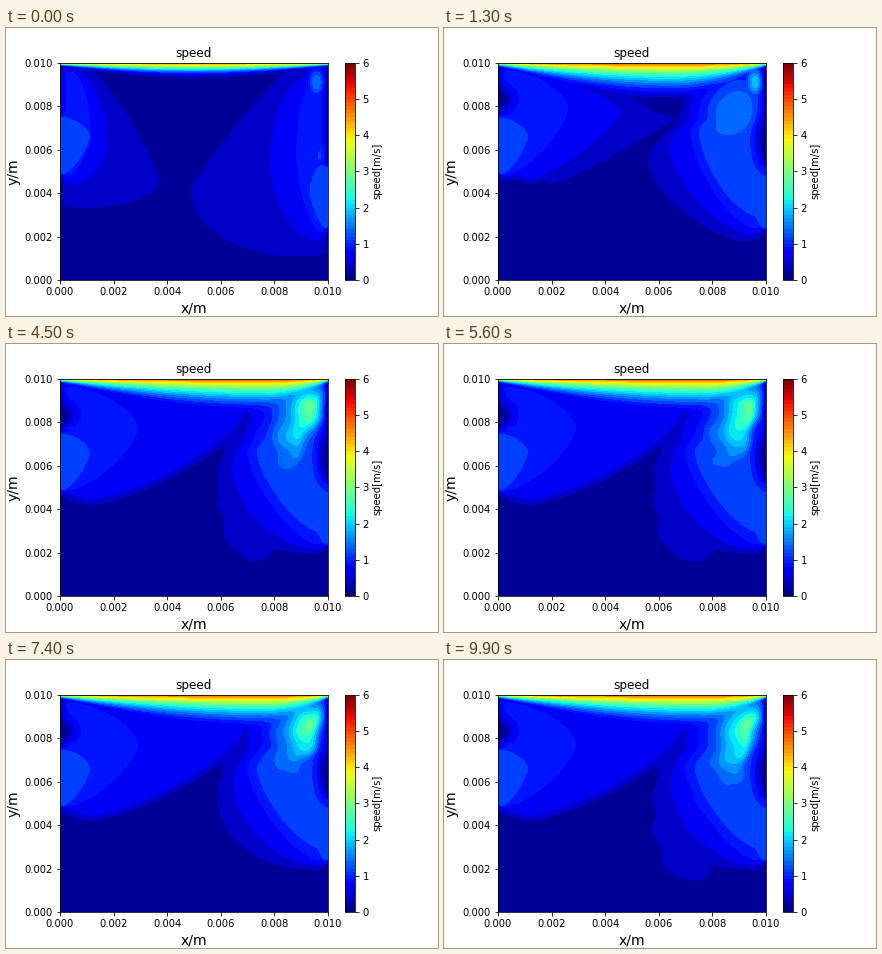
These frames come from a looping animation (432 px wide and 288 px high, 10000 ms). A matplotlib script:

```python
import numpy as np
import matplotlib.pyplot as plt
from matplotlib.animation import FuncAnimation
from matplotlib.cm import ScalarMappable
from matplotlib.colors import Normalize

FRAMES, STEP = 100, 100
SIZE = 0.01
LEVELS = np.linspace(0, 6, 25)
BAND = LEVELS[1]
COLORS = plt.cm.jet((LEVELS[:-1] + LEVELS[1:]) / 12)

# Positions are in percent of the box. Keys: start, spin-up, developed.
# Lobe: centre x, y, half width, reach up, reach down, exponents up, down
LEFT_OUTER = [(10, 46, 27, 52, 12.5, 1.2, 2.0),
              (20, 75, 46, 20, 31, 1.1, 1.1),
              (13, 85, 60, 20, 41, 1.35, 1.35)]
LEFT_INNER = [(3, 70, 8, 26, 22, 2.0, 1.7),
              (4, 79, 22, 17, 30, 1.6, 1.4),
              (4, 77, 25, 19, 28, 1.6, 1.4)]
RIGHT_OUTER = [(88, 42, 39, 58, 31, 1.1, 2.0),
               (92, 55, 36, 30, 37, 1.5, 1.5),
               (92, 53, 33, 33, 33, 2.0, 2.0)]
RIGHT_INNER = [(98, 56, 9.5, 36, 35, 2.5, 1.6),
               (96, 68, 24, 18, 44, 1.5, 1.5),
               (96, 66, 26, 25, 42, 1.4, 1.4)]
INLET = (0, 66, 11, 9, 18, 1.6, 1.4)
OUTLET = (100, 40, 6.5, 14, 17, 2.0, 1.4)
LEFT_BLEND = (0.75, 0.5, 0.1)
RIGHT_BLEND = (0.75, 0.5, 0.5)

FLOW = dict(
    top=(4.4, 5, 5), fade=(1.5, 1, 1), depth=(2.8, 7.2, 7.3),
    peak=(50, 65, 76), cx=(95, 88.5, 94), cy=(90, 77, 87),
    amp=(0.5, 1.5, 3.1), sharp=(2, 2, 1.1), left=(6, 16, 12),
    right=(5, 16, 6), down=(12, 27, 30), up=(8, 24, 12),
    corner=(1.5, 2, 0.8))

X, Y = np.meshgrid(np.linspace(0, 100, 150),
                   100 - 100 * np.linspace(1, 0, 150) ** 1.5)


def mix(keys, k):
    keys = np.array(keys, float)
    i = min(int(k), len(keys) - 2)
    return keys[i] + (keys[i + 1] - keys[i]) * (k - i)


def stage_of(t):
    """0 at the start, 1 after spin-up, 2 when developed."""
    if t < 1.3:
        return 1 - (1 - t / 1.3) ** 2
    s = min((t - 1.3) / 1.4, 1)
    return 1 + s * s * (3 - 2 * s)


def lobe(shape):
    """Superellipse measure: 1 on the rim, less inside."""
    cx, cy, a, up, down, p_up, p_down = shape
    above = Y > cy
    p = np.where(above, p_up, p_down)
    reach = np.where(above, up, down)
    return (abs(X - cx) / a) ** p + (abs(Y - cy) / reach) ** p


def plateau(n, q):
    """Speed that enters band n where q drops below 1."""
    return BAND * n + np.minimum(3 * (1 - q), BAND / 2)


def side(outer, inner, blend, port, core, k):
    a, b = mix(outer, k), mix(inner, k)
    q = lobe(b)
    return np.maximum.reduce([
        plateau(1, lobe(a)),
        plateau(2, lobe(a + (b - a) * mix(blend, k))),
        plateau(3, q),
        plateau(4, q / (core + 0.01)),
        plateau(4, lobe(port))])


def no_slip(dist, mid, half):
    port = 1 / (1 + np.exp(2 * (abs(Y - mid) - half)))
    return 1 - (1 - port) * np.exp(-dist / 1.2)


def dip(x, y, w, h, depth):
    return 1 - depth * np.exp(-((X - x) / w) ** 2 - ((Y - y) / h) ** 2)


WALLS = no_slip(X, 62.5, 14) * no_slip(100 - X, 38, 14.5)


def lid_layer(f):
    rise = np.sin(np.pi / 2 * np.minimum(X / f["peak"], 1))
    fall = np.cos(np.pi / 2 * np.clip((X - f["peak"]) / (100 - f["peak"]), 0, 1))
    d = (100 - Y) / (0.9 + f["depth"] * rise * fall)
    return f["top"] * np.exp(-d ** f["fade"]) * np.clip(1 - (d / 2.3) ** 4, 0, 1)


def plume(f, t, k):
    """Jet turning down at the right wall, with small travelling ripples."""
    wob = 0.35 * k * np.clip((100 - Y) / 20, 0.3, 1.5)
    x = X + wob * (np.sin(0.4 * Y + 5 * t) + 0.6 * np.sin(0.7 * X - 4 * t))
    y = Y + wob * (np.sin(0.45 * X + 3 * t) + 0.6 * np.sin(0.6 * Y + 6 * t))
    down = f["down"] - 3 * max(k - 1, 0) * np.cos(2 * np.pi * (t - 2.8) / 4.7)
    dx, dy = x - f["cx"], y - f["cy"]
    along, across = 0.3 * dx + 0.95 * dy, 0.95 * dx - 0.3 * dy
    along = along / np.where(along < 0, down, f["up"])
    across = across / np.where(across < 0, f["left"], f["right"])
    r = np.sqrt(along ** 2 + across ** 2 + 0.01)
    jet = f["amp"] * np.exp(-r ** f["sharp"])
    spot = f["corner"] * np.exp(-((x - 96) / 4) ** 2 - ((y - 91) / 8) ** 2)
    return np.maximum(jet, spot)


def speed(t):
    k = stage_of(t)
    grown = min(k, 1)
    f = {name: mix(keys, k) for name, keys in FLOW.items()}
    slow = np.maximum(
        side(LEFT_OUTER, LEFT_INNER, LEFT_BLEND, INLET, 0, k),
        side(RIGHT_OUTER, RIGHT_INNER, RIGHT_BLEND, OUTLET, 0.8 * grown, k))
    slow = np.maximum(slow, 0.1) * dip(0, 83.3, 5.8, 5.8, grown)
    eddy = dip(62.5, 80, 6, 4, max(0, 1 - 2 * abs(k - 1)))
    right = dip(100, 64, 4, 11, grown)
    fast = (lid_layer(f) ** 4 + (plume(f, t, k) * WALLS) ** 4) ** 0.25
    return np.maximum(slow * WALLS * right * eddy, fast * right * eddy)


fig, ax = plt.subplots(figsize=(6, 4), dpi=72)
fig.subplots_adjust(bottom=0.125)
scale = ScalarMappable(Normalize(0, 6), plt.get_cmap("jet", 60))
fig.colorbar(scale, ax=ax, ticks=range(7)).set_label("speed[m/s]")
ax.set_title("speed")
ax.set_xlabel("x/m", fontsize=14)
ax.set_ylabel("y/m", fontsize=14)
ax.set_xlim(0, SIZE)
ax.set_ylim(0, SIZE)
shown = []


def draw(i):
    while shown:
        shown.pop().remove()
    field = np.clip(speed(i * STEP / 1000), 0.01, 5.99)
    shown.append(ax.contourf(X * SIZE / 100, Y * SIZE / 100, field,
                             LEVELS, colors=COLORS))
    return []


anim = FuncAnimation(fig, draw, frames=FRAMES, interval=STEP,
                     init_func=lambda: draw(0), repeat=True, repeat_delay=0)
plt.show()
```
